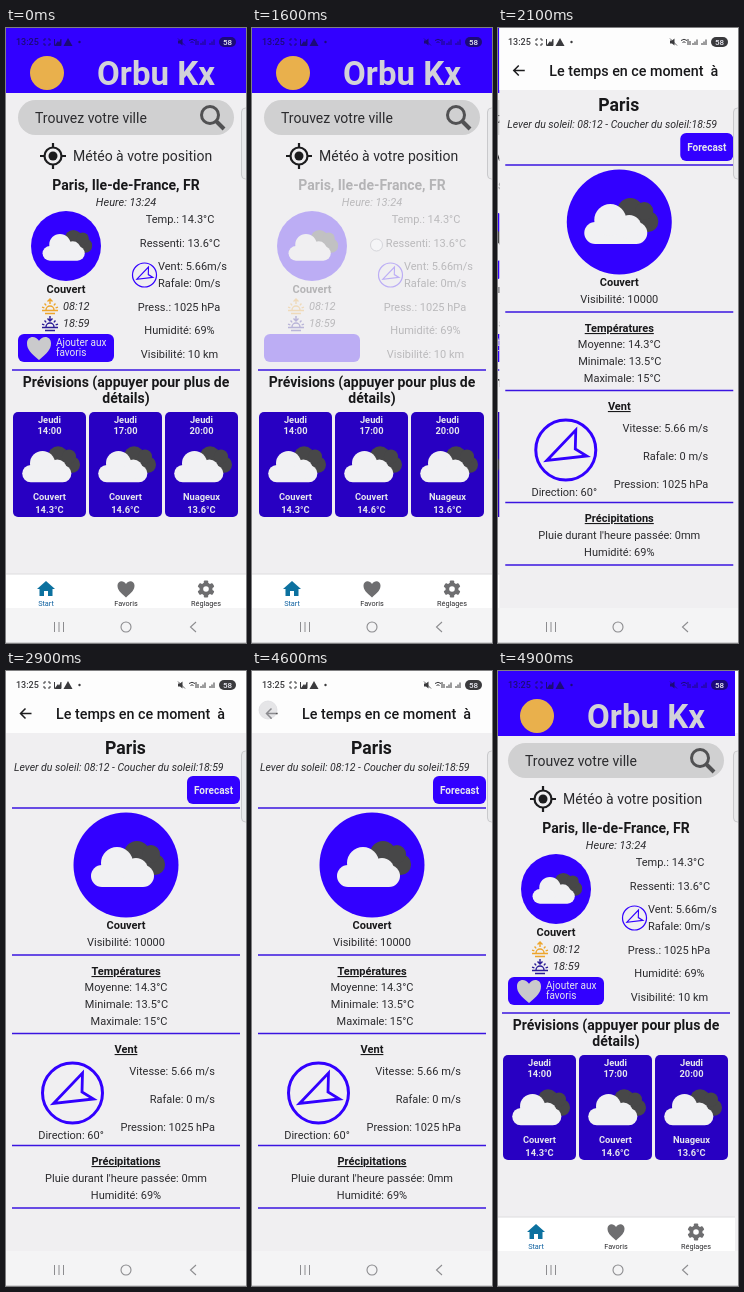
An HTML page for the animation above (5000 ms loop, 240 px wide and 615 px high).

```html
<!DOCTYPE html>
<html lang="fr">
<head>
<meta charset="utf-8">
<title>Météo</title>
<style>
html, body { margin: 0; width: 100%; height: 100%; overflow: hidden; background: #f0eff1; }
svg { display: block; width: 100vw; height: 100vh; }
text { font-family: Roboto, sans-serif; white-space: pre; text-anchor: middle; fill: #2b2b2e; }
.l { text-anchor: start; }
.r { text-anchor: end; }
.b { font-weight: 700; fill: #18181a; }
.m { font-weight: 500; fill: #18181a; }
.i { font-style: italic; }
.u { text-decoration: underline; }
.w { fill: #e6e6ee; }
</style>
</head>
<body>
<svg id="stage" viewBox="0 0 240 615">
  <g id="home"></g>
  <g id="detail"></g>
  <g id="system"></g>
  <circle id="touch"/>
</svg>
<script>
const BLUE = '#3200ff', DEEP = '#2800c2', PAGE = '#f0eff1';
const $ = id => document.getElementById(id);

const text = (x, y, s, size = 11, cls = '') =>
  `<text x="${x}" y="${y}" font-size="${size}" class="${cls}">${s}</text>`;
const box = (x, y, w, h, fill, r = 0) =>
  `<rect x="${x}" y="${y}" width="${w}" height="${h}" rx="${r}" fill="${fill}"/>`;
const disc = (x, y, r, fill) => `<circle cx="${x}" cy="${y}" r="${r}" fill="${fill}"/>`;
const ring = (x, y, r, color, w) =>
  `<circle cx="${x}" cy="${y}" r="${r}" fill="none" stroke="${color}" stroke-width="${w}"/>`;
const line = (d, color, w) =>
  `<path d="${d}" fill="none" stroke="${color}" stroke-width="${w}"/>`;
const shape = (d, fill) => `<path d="${d}" fill="${fill}"/>`;
const place = (x, y, k, body) => `<g transform="translate(${x} ${y}) scale(${k})">${body}</g>`;
const rule = y => line(`M6 ${y}H234`, '#3a14e0', 1.5);

const cloud = (x, y, k) => place(x, y, k,
  box(-2, -11, 41, 21, '#474748', 10) + disc(11, -11, 13, '#474748') + disc(25, -11, 9, '#474748') +
  box(-35, 0, 63, 22, '#f1f1f3', 11) + disc(-9, -2, 16, '#f1f1f3') + disc(10, 5, 12, '#f1f1f3'));

const compass = (x, y, k) => place(x, y, k,
  ring(0, 0, 30, BLUE, 3) +
  line('M-19 10.5L10 -20L9.500 -1L21 6Z', BLUE, 2.8));

const heart = (x, y, k, fill) => place(x, y, k,
  shape('M0 10C-7 4 -10 1 -10 -4C-10 -10 -3 -11 0 -6C3 -11 10 -10 10 -4C10 1 7 4 0 10Z', fill));

// Half sun on a horizon, with an arrow pointing up (dir = -1) or down (dir = 1)
function horizon(x, y, color, dir) {
  const rays = [200, 230, 310, 340].map(a => {
    const c = Math.cos(a * Math.PI / 180), s = Math.sin(a * Math.PI / 180);
    return `M${c * 6} ${3 + s * 6}L${c * 8.5} ${3 + s * 8.5}`;
  }).join('');
  const tip = dir < 0 ? -8 : -3;
  return place(x, y, 1, line(
    `M-8 3.500H8M-5 6.500H5M-4 3A4 4 0 0 1 4 3M0 -8V-3M-2.500 ${tip - dir * 2.5}L0 ${tip}L2.500 ${tip - dir * 2.5}` + rays,
    color, 1.4));
}

function gear(x, y, color) {
  const teeth = [0, 60, 120].map(a =>
    `<rect x="-2.200" y="-8.500" width="4.400" height="17" rx="1" transform="rotate(${a})" fill="${color}"/>`);
  return place(x, y, 1, teeth.join('') + ring(0, 0, 4.7, color, 3.6) + disc(0, 0, 2.8, '#fff'));
}

const card = ([hour, sky, temp], n) => {
  const x = 7 + 76 * n, mid = x + 36.5;
  return box(x, 384, 73, 105, DEEP, 5) + cloud(mid, 437, .78) +
    ['Jeudi', hour, sky, temp].map((s, k) =>
      text(mid, [395, 406, 472, 485][k], s, 9.3, 'b w')).join('');
};

$('home').innerHTML =
  box(0, 0, 240, 580, PAGE) + box(0, 0, 240, 65, BLUE) +
  disc(41, 45, 17, '#e9b04c') +
  text(150, 57, 'Orbu Kx', 33, 'b').replace('<text', '<text style="fill:#d2d2d8"') +
  box(12, 72, 216, 35, '#d0d0d1', 17.5) + text(29, 95, 'Trouvez votre ville', 14, 'l') +
  ring(204, 87, 8.5, '#515153', 3) + line('M210 93L218 101', '#515153', 4) +
  ring(47, 128, 8.5, '#1c1c1e', 2.2) + disc(47, 128, 4.5, '#1c1c1e') +
  line('M47 115V120M47 136V141M34 128H39M55 128H60', '#1c1c1e', 2.2) +
  text(67, 133, 'Météo à votre position', 14, 'l') +
  '<g id="panel">' +
    text(120, 162, 'Paris, Ile-de-France, FR', 14, 'b') +
    text(120, 178, 'Heure: 13:24', 11, 'i') +
    disc(60, 218, 35, BLUE) + cloud(60, 218, .67) +
    text(60, 265, 'Couvert', 11, 'b') +
    horizon(44, 279, '#eda52b', -1) + text(57, 282, '08:12', 11, 'i l') +
    horizon(44, 296, '#2a1b96', 1) + text(57, 299, '18:59', 11, 'i l') +
    box(12, 306, 96, 28, BLUE, 6) +
    '<g id="favourite">' + heart(33, 320, 1.2, '#cacacc') +
      text(50, 318, 'Ajouter aux', 10, 'l w') + text(50, 328, 'favoris', 10, 'l w') + '</g>' +
    text(174, 195, 'Temp.: 14.3°C') + text(174, 219, 'Ressenti: 13.6°C') +
    compass(138.5, 247, .4) +
    text(152, 242, 'Vent: 5.66m/s', 11, 'l') + text(152, 259, 'Rafale: 0m/s', 11, 'l') +
    text(173, 283, 'Press.: 1025 hPa') + text(173.5, 306, 'Humidité: 69%') +
    text(173.5, 330, 'Visibilité: 10 km') +
  '</g>' +
  rule(342) +
  text(120, 359, 'Prévisions (appuyer pour plus de', 14, 'b') + text(120, 375, 'détails)', 14, 'b') +
  [['14:00', 'Couvert', '14.3°C'], ['17:00', 'Couvert', '14.6°C'], ['20:00', 'Nuageux', '13.6°C']]
    .map(card).join('') +
  box(0, 546, 240, 34, '#fff') + line('M0 546H240', '#dcdcde', 1) +
  shape('M40 553L49 561H46.500V568H42V563H38V568H33.500V561H31Z', '#0c719f') +
  heart(120, 561, .85, '#6e6e70') + gear(200, 561, '#6e6e70') +
  text(40, 578, 'Start', 7.3).replace('<text', '<text style="fill:#0c5f9f"') +
  text(120, 578, 'Favoris', 7.3) + text(200, 578, 'Réglages', 7.3);

$('detail').innerHTML =
  box(0, 0, 240, 580, PAGE) + box(0, 0, 240, 62, '#fdfdfd') +
  line('M25.500 42.500H15M19.500 37.500L14.500 42.500L19.500 47.500', '#1c1c1e', 1.5) +
  text(50, 48, 'Le temps en ce moment  à', 14.3, 'm l') +
  text(119.5, 83, 'Paris', 17.6, 'b') +
  text(8, 100, 'Lever du soleil: 08:12 - Coucher du soleil:18:59', 10.5, 'i l') +
  box(181, 105, 53, 28, BLUE, 6) + text(207.5, 123, 'Forecast', 10, 'b w') +
  [137, 284, 362.5, 474.5, 537].map(rule).join('') +
  disc(120, 194, 52.5, BLUE) + cloud(120, 194, 1) +
  text(120, 258, 'Couvert', 11, 'b') + text(120, 275, 'Visibilité: 10000') +
  text(120, 304, 'Températures', 11, 'b u') + text(120, 320, 'Moyenne: 14.3°C') +
  text(120.5, 337, 'Minimale: 13.5°C') + text(123, 354, 'Maximale: 15°C') +
  text(120, 382, 'Vent', 11, 'b u') + compass(66.5, 422, 1) +
  text(65, 468, 'Direction: 60°') +
  text(209, 404, 'Vitesse: 5.66 m/s', 11, 'r') + text(209, 432, 'Rafale: 0 m/s', 11, 'r') +
  text(209, 460, 'Pression: 1025 hPa', 11, 'r') +
  text(120, 494, 'Précipitations', 11, 'b u') +
  text(120, 511, "Pluie durant l'heure passée: 0mm") + text(120, 528, 'Humidité: 69%');

const ink = 'currentColor';
$('system').innerHTML =
  '<g id="status">' +
    text(10, 17, '13:25', 9, 'm l').replace('<text', '<text style="fill:currentColor"') +
    line('M40 11H38V13M42 11H44V13M38 15V17H40M44 15V17H42', ink, 1) +
    line('M48.500 11V17.500H55V11', ink, 1) + shape('M49 17L52 13L53 14.500L55 11V17Z', ink) +
    shape('M57.500 18L62 10L66.500 18Z', ink) + disc(73.5, 14, 1.2, ink) +
    shape('M172 12.500H174L176.500 10.500V17.500L174 15.500H172Z', ink) +
    line('M172 10.500L179 17.500', ink, .8) +
    line('M183 12.500Q186 10 189 12.500M184.500 14.500Q186 13 187.500 14.500M190 11V17M192 13V17', ink, 1) +
    line('M195 17V15M197 17V13.500M199 17V11.500M204 17V15M206 17V13.500M208 17V11.500', ink, 1) +
    box(213, 9, 17, 10, ink, 5) + text(221.5, 17, '58', 8, 'm w') +
  '</g>' +
  box(0, 580, 240, 35, '#f4f4f5') + line('M0 614.500H240', '#d2d2d4', 1) +
  line('M48.500 594V604M53 594V604M57.500 594V604', '#8c8c8f', 1) +
  ring(120, 599, 5, '#8c8c8f', 1.1) + line('M190 594L184.500 599L190 604', '#8c8c8f', 1.1) +
  '<rect x="235.500" y="80" width="10" height="71" rx="4" fill="#e9e9eb" stroke="#c9c9cc"/>';

// Tracks of [ms, value], linear in between
const sheetX = [[1640, 240], [1700, 120], [1800, 2.6], [2000, 1.6], [2500, 0],
  [4660, 0], [4700, 60], [4800, 215], [4900, 237], [5000, 239]];
const homeX = [[1640, 0], [1700, -36], [1800, -71], [2500, -72],
  [4660, -72], [4700, -54], [4800, -9], [4900, -2], [5000, -1]];
const fade = [[1460, 1], [1590, .27], [1640, .27], [1760, 1]];

function at(track, t) {
  const k = track.findIndex(p => p[0] > t);
  if (k === 0) return track[0][1];
  if (k < 0) return track[track.length - 1][1];
  const [t0, a] = track[k - 1], [t1, b] = track[k];
  return a + (b - a) * (t - t0) / (t1 - t0);
}

function showTouch(x, y, r, fill, opacity) {
  const set = { cx: x, cy: y, r, fill, opacity, stroke: '#c4c4ca', 'stroke-width': .7 };
  for (const key in set) $('touch').setAttribute(key, set[key]);
}

function draw(now) {
  const t = now % 5000, alpha = at(fade, t);
  $('home').setAttribute('transform', `translate(${at(homeX, t)} 0)`);
  $('detail').setAttribute('transform', `translate(${at(sheetX, t)} 0)`);
  $('panel').setAttribute('opacity', alpha);
  $('favourite').setAttribute('opacity', Math.max(0, (alpha - .27) / .73));
  $('status').style.color = t >= 1700 && t < 4760 ? '#3a3a3d' : '#1c0b78';
  if (t >= 1480 && t < 1680) showTouch(124.5, 217, 6, '#f6f6f8', .9);
  else if (t >= 4520 && t < 4700) showTouch(16, 39, 9, '#d6d6da', .6);
  else showTouch(0, 0, 0, 'none', 0);
  requestAnimationFrame(draw);
}
draw(performance.now());
</script>
</body>
</html>
```
